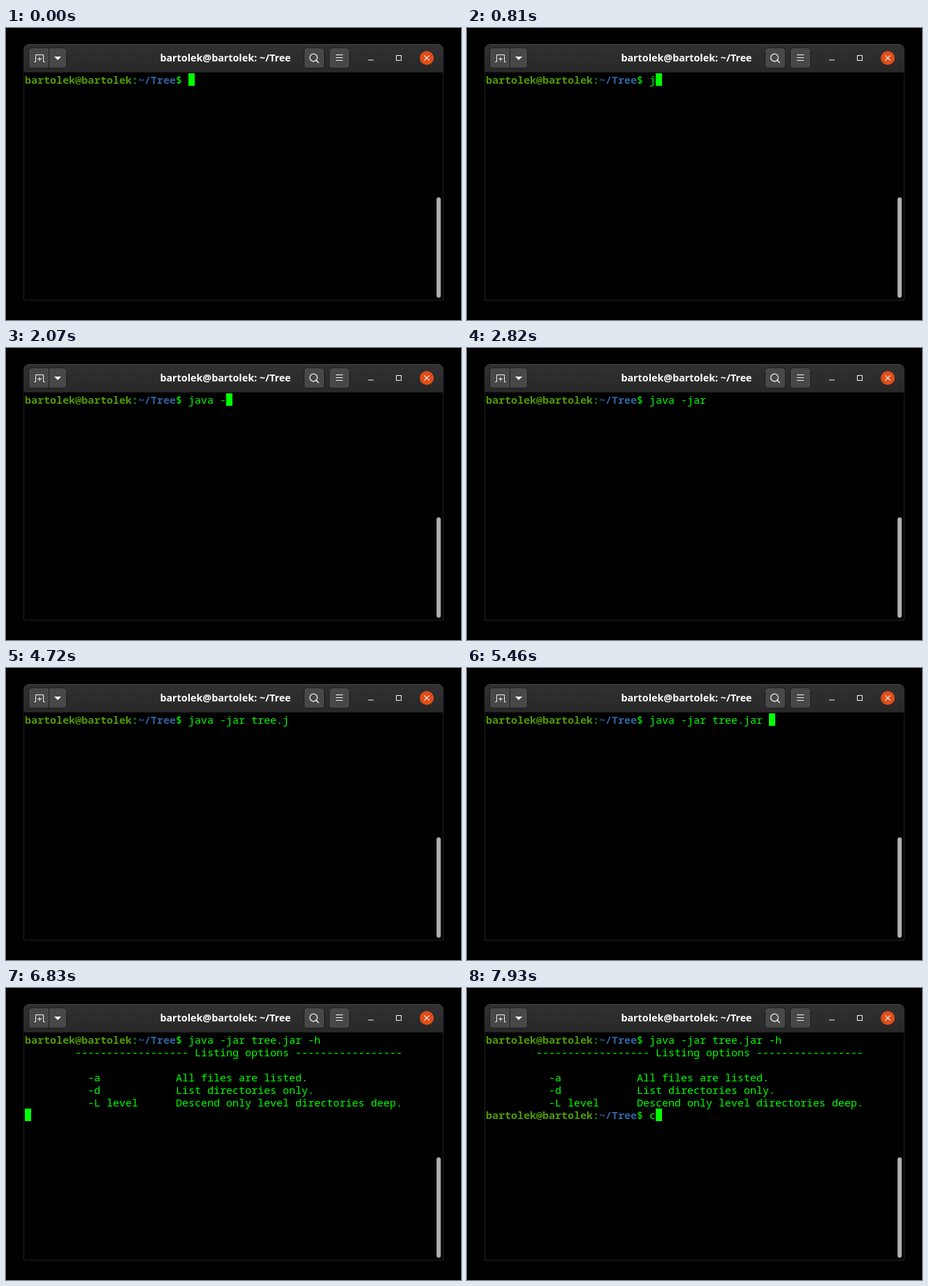
An HTML page that plays this animation: 651 px wide and 419 px high, repeating every 8 s.

```html
<!DOCTYPE html>
<html lang="en">
<head>
<meta charset="utf-8">
<title>Terminal</title>
<style>
  html, body { margin: 0; width: 100%; height: 100%; overflow: hidden; background: #000; }
  svg { display: block; }
  .row { font: 15px "Noto Sans Mono", "DejaVu Sans Mono", monospace; fill: #0f0; white-space: pre; font-variant-ligatures: none; }
  .user, .path { font-weight: bold; fill: #4e9a06; }
  .path { fill: #3465a4; }
  .title { font: bold 14.3px "Open Sans", "Noto Sans", sans-serif; fill: #fff; text-anchor: middle; }
  .button { fill: #484848; stroke: #1d1d1d; }
  .icon { fill: none; stroke: #f4f4f4; }
</style>
</head>
<body>
<svg width="651" height="419" viewBox="0 0 651 419">
  <defs>
    <linearGradient id="bar" x2="0" y2="1">
      <stop stop-color="#313131"/>
      <stop offset="1" stop-color="#282828"/>
    </linearGradient>
  </defs>
  <path d="M25.5 63V390.5H625.5V63" fill="none" stroke="#222"/>
  <path d="M25 64V31a8 8 0 0 1 8-8H618a8 8 0 0 1 8 8V64Z" fill="url(#bar)"/>
  <path d="M32 23.5H619" stroke="#414141"/>
  <path d="M25 63.5H626" stroke="#1b1b1b"/>

  <rect class="button" x="32.5" y="28.5" width="54" height="29" rx="4"/>
  <path d="M61.5 29V57" stroke="#202020"/>
  <rect class="button" x="426.5" y="28.5" width="29" height="29" rx="4"/>
  <rect class="button" x="462.5" y="28.5" width="29" height="29" rx="4"/>
  <path class="icon" d="M40 48.5H42.5V38.5H53.5V48.5H56M45 44.5H51M48 41.5V47.5"/>
  <path d="M69 41H79L74 46Z" fill="#fff"/>
  <g class="icon">
    <circle cx="440" cy="42.5" r="5.3" stroke-width="1.2"/>
    <path d="M443.8 46.3L447.5 50" stroke-width="1.3"/>
    <path d="M472 38.5H482M472 42.5H482M472 46.5H482"/>
    <path d="M518 46H526"/>
    <rect x="558.5" y="39.5" width="7" height="7"/>
  </g>
  <circle cx="602" cy="43" r="10" fill="#e04e18"/>
  <path class="icon" d="M598.3 39.3L605.7 46.7M605.7 39.3L598.3 46.7" stroke-width="1.2"/>
  <text class="title" x="314" y="48">bartolek@bartolek: ~/Tree</text>

  <g id="screen"></g>
  <rect id="cursor" width="9" height="18" fill="#0f0"/>
  <rect x="616" y="243" width="6" height="144" rx="3" fill="#aeaeae"/>
</svg>
<script>
const LOOP = 8000, LEFT = 27, TOP = 65, CELL = 9, LINE = 18, PROMPT_COLS = 26;
const ENTER = 6780, OUTPUT = 6830, DONE = 6930, NEXT_KEY = 7930;
const command = 'java -jar tree.jar -h';
const keyTimes = [810, 1020, 1270, 1410, 1690, 2070, 2460, 2570, 2820, 3200, 3520,
  3640, 3880, 4080, 4280, 4720, 4900, 5150, 5460, 5990, 6380];
const option = (flag, help) => ' '.repeat(10) + flag.padEnd(14) + help;
const help = [
  ' '.repeat(8) + '-'.repeat(18) + ' Listing options ' + '-'.repeat(17),
  '',
  option('-a', 'All files are listed.'),
  option('-d', 'List directories only.'),
  option('-L level', 'Descend only level directories deep.')
];
const prompt = '<tspan class="user">bartolek@bartolek</tspan>:<tspan class="path">~/Tree</tspan>$ ';
const screen = document.getElementById('screen');
const cursor = document.getElementById('cursor');
let shown = '';

function draw(t) {
  const typed = command.slice(0, keyTimes.filter(k => k <= t).length);
  const rows = [prompt + typed];
  let col = PROMPT_COLS + typed.length, row = 0;
  if (t >= ENTER) { col = 0; row = 1; }
  if (t >= OUTPUT) { rows.push(...help); row = 6; }
  if (t >= DONE) {
    const next = t >= NEXT_KEY ? 'c' : '';
    rows.push(prompt + next);
    col = PROMPT_COLS + next.length;
  }
  const markup = rows.map((s, i) =>
    `<text class="row" x="${LEFT}" y="${TOP + 15 + i * LINE}">${s}</text>`).join('');
  if (markup !== shown) screen.innerHTML = shown = markup;
  cursor.setAttribute('x', LEFT + col * CELL);
  cursor.setAttribute('y', TOP + row * LINE);
  // The cursor is in its dark blink phase here
  cursor.setAttribute('visibility', t >= 2820 && t < 5150 ? 'hidden' : 'visible');
}

const start = performance.now();
function tick() {
  draw((performance.now() - start) % LOOP);
  requestAnimationFrame(tick);
}
tick();
</script>
</body>
</html>
```
